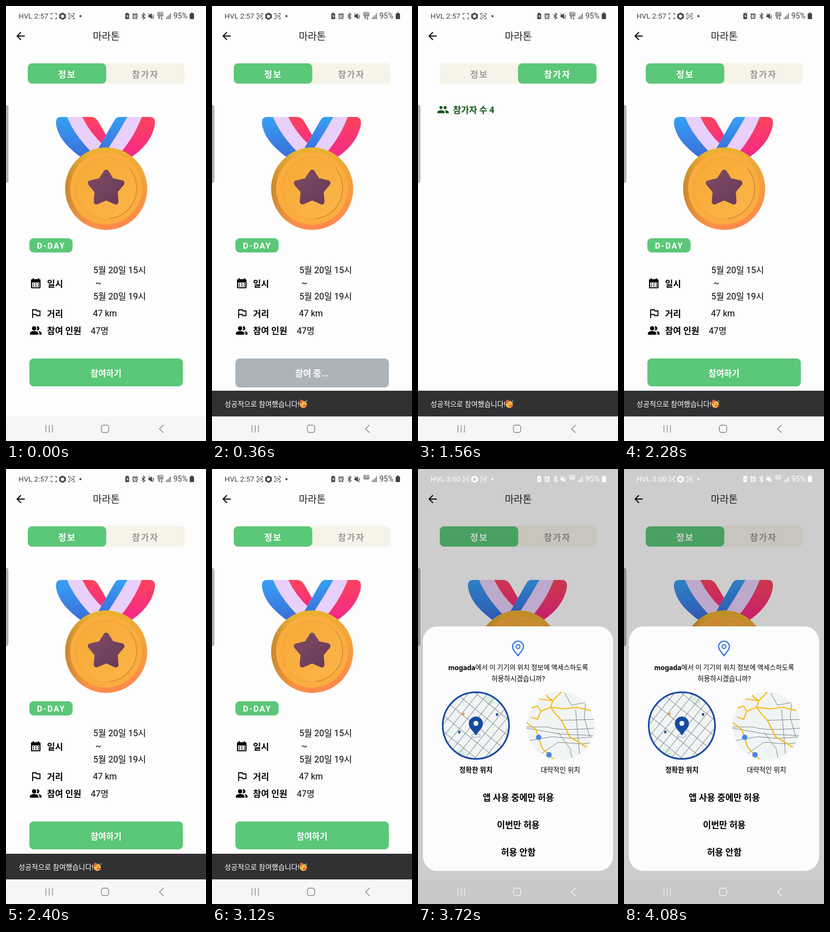
These frames come from a looping animation (368 px wide and 796 px high, 4200 ms). An HTML page:

```html
<!DOCTYPE html>
<html lang="ko">
<head>
<meta charset="utf-8">
<title>마라톤</title>
<style>
html, body { margin: 0; width: 100%; height: 100%; overflow: hidden; background: #fdfdfd; }
svg { display: block; width: 368px; height: 796px; }
text { font: 16px Roboto, 'Noto Sans CJK KR', 'Noto Sans CJK', sans-serif; white-space: pre; }
.bold { font-weight: 700; }
.mid { text-anchor: middle; }
.title { font-size: 18px; fill: #222; }
.tab { font-weight: 700; letter-spacing: 1.8px; text-anchor: middle; }
.small { font-size: 12.6px; fill: #000; }
.choice { font-size: 16.2px; font-weight: 700; text-anchor: middle; }
.line { fill: none; stroke: currentColor; }

/* Everything switches hard on one shared clock */
.info, .people, .joined, .ready, .toast, .dialog, .clockA, .clockB, .core, .arrows, .status, .nav {
  animation: 4200ms step-end infinite;
}
.info { animation-name: info; }
.people { animation-name: people; }
.joined { animation-name: joined; }
.ready { animation-name: ready; }
.toast { animation-name: toast; }
.dialog, .clockB { animation-name: dialog; }
.clockA { animation-name: clockA; }
.core { animation-name: core; }
.arrows { animation-name: arrows; }
.status { animation-name: status; }
.nav { animation-name: nav; }
@keyframes info { 0%, 48.55% { visibility: visible } 28.55% { visibility: hidden } }
@keyframes people { 0%, 48.55% { visibility: hidden } 28.55% { visibility: visible } }
@keyframes joined { 0%, 28.55% { opacity: 0 } 2.84% { opacity: 1 } }
@keyframes ready { 0%, 28.55% { opacity: 1 } 2.84% { opacity: 0 } }
@keyframes toast { 0%, 77.12% { visibility: hidden } 5.7% { visibility: visible } }
@keyframes dialog { 0% { visibility: hidden } 77.12% { visibility: visible } }
@keyframes clockA { 0% { visibility: visible } 77.12% { visibility: hidden } }
@keyframes core { 0%, 28.55% { visibility: hidden } 2.84%, 62.84% { visibility: visible } }
@keyframes arrows { 0% { visibility: visible } 62.84% { visibility: hidden } }
@keyframes status { 0% { color: #444 } 77.12% { color: #fff } }
@keyframes nav { 0% { color: #888 } 77.12% { color: #f2f2f2 } }
</style>
</head>
<body>
<svg viewBox="0 0 368 796">
<defs>
  <linearGradient id="rim" x1=".3" y1="0" x2=".6" y2="1">
    <stop offset="0" stop-color="#eab32e"/><stop offset=".5" stop-color="#f2a43a"/><stop offset="1" stop-color="#ff874e"/>
  </linearGradient>
  <linearGradient id="shade" x1="0" x2="1">
    <stop offset="0" stop-color="#b97a2c" stop-opacity=".7"/><stop offset=".3" stop-color="#c98a34" stop-opacity="0"/>
  </linearGradient>
  <linearGradient id="face" x1="0" y1="0" x2=".8" y2="1">
    <stop offset="0" stop-color="#f6a935"/><stop offset="1" stop-color="#fcb448"/>
  </linearGradient>
  <linearGradient id="blue" x1="0" y1="0" x2="0" y2="1">
    <stop offset="0" stop-color="#37a2f5"/><stop offset="1" stop-color="#3a6cd8"/>
  </linearGradient>
  <linearGradient id="red" x1="0" y1="0" x2="0" y2="1">
    <stop offset="0" stop-color="#fb4659"/><stop offset="1" stop-color="#f5268c"/>
  </linearGradient>
  <linearGradient id="star" x1="0" y1="0" x2="1" y2="1">
    <stop offset="0" stop-color="#7d4a63"/><stop offset="1" stop-color="#693a58"/>
  </linearGradient>
  <clipPath id="ribbonL"><path d="M101 203H156Q165 203 170 212L188 243L178 266L138 277C112 258 96 240 92 216Q91 203 101 203Z"/></clipPath>
  <clipPath id="ribbonR"><path d="M208 203H265Q275 203 274 216C270 240 256 259 230 277L168 264L199 210Q203 203 208 203Z"/></clipPath>
  <clipPath id="mapL"><circle cx="106.5" cy="469.5" r="61"/></clipPath>
  <clipPath id="mapR"><circle cx="262" cy="470" r="62.5"/></clipPath>
  <pattern id="blocks" width="23" height="14" patternUnits="userSpaceOnUse" patternTransform="translate(101 466) rotate(-51)">
    <path d="M0 .5H23M.5 0V14" fill="none" stroke="#8b8e91"/>
  </pattern>
  <path id="pin" d="M0 0C-3-7-13-13-13-22A13 13 0 0 1 13-22C13-13 3-7 0 0Z"/>
  <path id="scan" class="line" d="M-5-2V-5H-2M2-5H5V-2M5 2V5H2M-2 5H-5V2" stroke-width="1.1"/>
  <g id="lens"><rect x="-3" y="-2" width="4.6" height="4" rx="1" class="line"/><path d="M2 0L4-2V2Z" fill="currentColor"/></g>
</defs>

<rect width="368" height="796" fill="#fdfdfd"/>

<!-- header and tab track -->
<path d="M34.5 55H21M27.5 48L20.5 55L27.5 62" fill="none" stroke="#111" stroke-width="2"/>
<text class="title mid" x="184.5" y="62">마라톤</text>
<rect x="40" y="104" width="288.5" height="38.5" rx="8" fill="#f6f3e8"/>

<g class="info">
  <rect x="40" y="105" width="144.5" height="37" rx="8" fill="#5bc778"/>
  <text class="tab" x="112.5" y="131" fill="#fff">정보</text>
  <text class="tab" x="256.5" y="131" fill="#9b9b9b">참가자</text>

  <!-- medal -->
  <g clip-path="url(#ribbonL)">
    <rect x="90" y="200" width="100" height="80" fill="#e9d0fb"/>
    <path d="M85 200H111Q125 236 160 270V280H85Z" fill="url(#blue)"/>
    <path d="M139 200H195V268Q156 238 139 200Z" fill="url(#red)"/>
  </g>
  <g clip-path="url(#ribbonR)">
    <rect x="165" y="200" width="112" height="80" fill="#e9d0fb"/>
    <path d="M165 200H225Q204 238 180 272H165Z" fill="url(#blue)"/>
    <path d="M251 200H280V280H200Q234 246 251 200Z" fill="url(#red)"/>
  </g>
  <circle cx="184.3" cy="334.3" r="75.5" fill="url(#rim)"/>
  <circle cx="184.3" cy="334.3" r="75.5" fill="url(#shade)"/>
  <circle cx="184" cy="334" r="66" fill="#faac3e"/>
  <circle cx="184.5" cy="333.5" r="56.5" fill="url(#face)" stroke="#eda03a"/>
  <path d="M228 298A56 56 0 0 1 190 389" fill="none" stroke="#d68d3a" stroke-width="1.6"/>
  <path d="M184.3 304.5L194 319.7L213 324L200.5 338.7L202 358.2L184.3 350.5L166.4 358.2L168 338.7L155.5 324L174.3 319.7Z"
    fill="url(#star)" stroke="url(#star)" stroke-width="10" stroke-linejoin="round"/>

  <rect x="43" y="425" width="79.5" height="26" rx="8" fill="#5bc778"/>
  <text class="bold" x="57" y="443.5" fill="#fff" style="font-size:15px;letter-spacing:1.8px">D-DAY</text>

  <!-- calendar, flag and people -->
  <path fill-rule="evenodd" d="M49 498h2v2h7.5v-2h2v2h1.5q1.5 0 1.5 1.5v13.5q0 1.5-1.5 1.5h-14.5q-1.5 0-1.5-1.5v-13.5q0-1.5 1.5-1.5h1.5zM48 506v8.6h13.5v-8.6z"/>
  <path d="M49.5 508.5H60.5M49.5 512H60.5" stroke="#000" stroke-width="2" stroke-dasharray="2 2.5"/>
  <path d="M49 571V556H56L57 558H62.5V566.5H56.5L55.5 564.5H49" fill="none" stroke="#000" stroke-width="1.8"/>
  <g transform="translate(43 582.1) scale(.97)">
    <circle cx="9" cy="8" r="4"/>
    <path d="M9 13c-2.67 0-8 1.34-8 4v3h16v-3c0-2.66-5.33-4-8-4zM16.67 13.13C18.04 14.06 19 15.32 19 17v3h4v-3c0-2.18-3.57-3.47-6.33-3.87zM15 12c2.21 0 4-1.79 4-4s-1.79-4-4-4c-.47 0-.91.1-1.33.24C14.5 5.27 15 6.58 15 8s-.5 2.73-1.33 3.76c.42.14.86.24 1.33.24z"/>
  </g>
  <text class="bold" x="75.5" y="514">일시</text>
  <text class="bold" x="75.5" y="569">거리</text>
  <text class="bold" x="75.5" y="600">참여 인원</text>
  <text x="160.5" y="489">5월 20일 15시</text>
  <text x="164.5" y="513">~</text>
  <text x="160.5" y="537">5월 20일 19시</text>
  <text x="160" y="568">47 km</text>
  <text x="156" y="600">47명</text>

  <g class="ready">
    <rect x="43" y="645" width="282.5" height="51" rx="8" fill="#5bc778"/>
    <text class="bold mid" x="184" y="678" fill="#fff" style="font-size:15.5px">참여하기</text>
  </g>
  <g class="joined">
    <rect x="43" y="645" width="282.5" height="53" rx="8" fill="#abb4bb"/>
    <text class="bold mid" x="184" y="678" fill="#fff">참여 중...</text>
  </g>
</g>

<g class="people">
  <rect x="184" y="105" width="144.5" height="37" rx="8" fill="#5bc778"/>
  <text class="tab" x="112.5" y="131" fill="#9b9b9b">정보</text>
  <text class="tab" x="256.5" y="131" fill="#fff">참가자</text>
  <g fill="#11571a">
    <path transform="translate(34.7 178.3) scale(.95)" d="M16 11c1.66 0 2.99-1.34 2.99-3S17.66 5 16 5c-1.66 0-3 1.34-3 3s1.34 3 3 3zm-8 0c1.66 0 2.99-1.34 2.99-3S9.66 5 8 5C6.34 5 5 6.34 5 8s1.34 3 3 3zm0 2c-2.33 0-7 1.17-7 3.5V19h14v-2.5c0-2.33-4.67-3.5-7-3.5zm8 0c-.29 0-.62.02-.97.05 1.16.84 1.97 1.97 1.97 3.45V19h6v-2.5c0-2.33-4.67-3.5-7-3.5z"/>
    <text class="bold" x="64.5" y="196">참가자 수 4</text>
  </g>
</g>

<path d="M0 181Q4.5 181 4.5 186V319Q4.5 324 0 324Z" fill="#b3b3b3"/>

<g class="toast">
  <rect y="704" width="368" height="47" fill="#313133"/>
  <text x="23" y="733" fill="#fff" style="font-size:13px">성공적으로 참여했습니다!</text>
  <circle cx="168" cy="729" r="6.5" fill="#f9bd45"/>
  <path d="M161 728L163 720L170 723Z" fill="#e9683f"/>
  <path d="M164 728l2-1M169 727l2 1" stroke="#6b3d20"/>
  <path d="M167 732l5-1 3 2" fill="none" stroke="#d8433f" stroke-width="2"/>
  <circle cx="174" cy="723" r="1.3" fill="#59b6c8"/>
</g>

<rect y="751" width="368" height="45" fill="#f6f6f8"/>
<rect class="dialog" width="368" height="796" fill="#000" opacity=".19"/>

<g class="nav">
  <path class="line" d="M73.5 767V780.5M79.5 767V780.5M85.5 767V780.5" stroke-width="1.3"/>
  <rect class="line" x="175.5" y="767" width="13.5" height="13.5" rx="4" stroke-width="1.4"/>
  <path class="line" d="M290 766.5L282.5 773.7L290 781" stroke-width="1.4"/>
</g>

<!-- status bar -->
<g class="status" fill="currentColor">
  <text class="clockA" x="23" y="23" style="font-size:13.5px">HVL 2:57</text>
  <text class="clockB" x="23" y="23" style="font-size:13.5px">HVL 3:00</text>
  <use href="#scan" x="88" y="18.5"/>
  <use class="core" href="#lens" x="88" y="18.5"/>
  <path fill-rule="evenodd" d="M104 12l6 3.3v6.8l-6 3.3l-6-3.3v-6.8zM104 15.5l-3 1.6v3.4l3 1.7l3-1.7v-3.4z"/>
  <use href="#scan" x="120.5" y="18.5"/>
  <use href="#lens" x="120.5" y="18.5"/>
  <circle cx="137" cy="18.5" r="1.9"/>
  <path fill-rule="evenodd" d="M220.5 13.5h1v-1h3v1h1q1 0 1 1v8.500q0 1-1 1h-5q-1 0-1-1v-8.500q0-1 1-1zM223.500 15l-2 4h1.500v3l2.200-4h-1.700z"/>
  <circle class="line" cx="237.5" cy="18.7" r="3.8" stroke-width="1.6"/>
  <path class="line" d="M237.5 16.5V19H239.5M233 15.5L235 13.5M242 15.5L240 13.5M235 22.5L233.5 24M240 22.5L241.5 24" stroke-width="1.2"/>
  <path class="line" d="M249.5 15.5L256 21.5L252.8 24V13L256 15.5L249.5 21.5" stroke-width="1.1"/>
  <path d="M262 16.5h2.5l4-3.5v11l-4-3.5h-2.5z"/>
  <path class="line" d="M262 13L272 24M270.5 16Q272.5 18.5 270.5 21" stroke-width="1.1"/>
  <rect class="line" x="279" y="11.5" width="10" height="7" rx="1" stroke-width=".8"/>
  <text class="bold mid" x="284" y="17.7" style="font-size:7px">5G</text>
  <path class="line arrows" d="M282 24V20L280.5 21.5M286 20V24L287.5 22.5" stroke-width="1.2"/>
  <path class="line" d="M295 24V21M297.5 24V19M300 24V16.5M302.5 24V13.5" stroke-width="1.2"/>
  <text x="308" y="23" style="font-size:14px">95%</text>
  <path d="M339.5 13.5h1v-1.5h3v1.5h1q1.5 0 1.5 1.5v7.5q0 1.5-1.5 1.5h-5q-1.5 0-1.5-1.5v-7.5q0-1.5 1.5-1.5z"/>
</g>

<g class="dialog">
  <rect x="9" y="288" width="350" height="447.5" rx="27" fill="#fcfcfe"/>
  <path d="M184 341.5C180 336 174 331 174 325A10 10 0 0 1 194 325C194 331 188 336 184 341.5Z" fill="none" stroke="#3273e2" stroke-width="2.2"/>
  <circle cx="184" cy="325" r="3.5" fill="none" stroke="#3273e2" stroke-width="2"/>
  <text class="small mid" x="184.5" y="368" style="font-size:12.3px"><tspan class="bold" style="font-family:Inter,sans-serif;font-size:12.6px">mogada</tspan>에서 이 기기의 위치 정보에 액세스하도록</text>
  <text class="small mid" x="184.5" y="388">허용하시겠습니까?</text>

  <!-- precise map -->
  <circle cx="106.5" cy="469.5" r="61" fill="#f1f4f4"/>
  <g clip-path="url(#mapL)">
    <path d="M122 420L134 414L142 428L132 432ZM70 515L82 510L90 522L80 530Z" fill="#d9eedb"/>
    <rect x="44" y="407" width="125" height="125" fill="url(#blocks)"/>
  </g>
  <circle cx="106.5" cy="469.5" r="61" fill="none" stroke="#164aa2" stroke-width="3"/>
  <ellipse cx="106.5" cy="488" rx="8" ry="3" fill="#fff" stroke="#6f8fc8"/>
  <use href="#pin" x="106.5" y="488" fill="#164aa2"/>
  <circle cx="106.5" cy="465.5" r="4.5" fill="#fff"/>
  <use href="#pin" transform="translate(83.5 452) scale(.18)" fill="#ee9a20"/>
  <use href="#pin" transform="translate(145.5 453) scale(.18)" fill="#164aa2"/>
  <use href="#pin" transform="translate(76 485) scale(.18)" fill="#164aa2"/>

  <!-- approximate map -->
  <circle cx="262" cy="470" r="62.5" fill="#f1f4f4"/>
  <g clip-path="url(#mapR)" fill="none">
    <path stroke="#85888b" d="M198 472H238Q258 480 326 474M198 474L262 485L326 488M198 498L246 490L284 493L326 490M262 460L326 458M228 520L258 500L300 503L326 500M258 482L280 512L284 532M290 440L293 475L298 532M308 430L306 455L316 490M270 410L282 432L316 426"/>
    <path stroke="#f6bd20" stroke-width="2.2" stroke-linejoin="round" d="M232 406L238 417L248 424L244 436L252 447L264 460L279 490L296 500L318 514M214 420L248 424L264 408M198 440L220 434L226 443L244 436L270 439L292 436L326 444M208 454L220 458L226 443M200 464L217 477L222 491L228 510L241 523L252 534"/>
  </g>
  <circle cx="222" cy="491" r="5" fill="#4a86e8"/>
  <circle cx="241" cy="523" r="5" fill="#4a86e8"/>

  <text class="small bold mid" x="106.5" y="555">정확한 위치</text>
  <text class="small mid" x="262" y="555">대략적인 위치</text>
  <text class="choice" x="184.5" y="607">앱 사용 중에만 허용</text>
  <text class="choice" x="184.5" y="657">이번만 허용</text>
  <text class="choice" x="184.5" y="707">허용 안함</text>
</g>
</svg>
</body>
</html>
```
